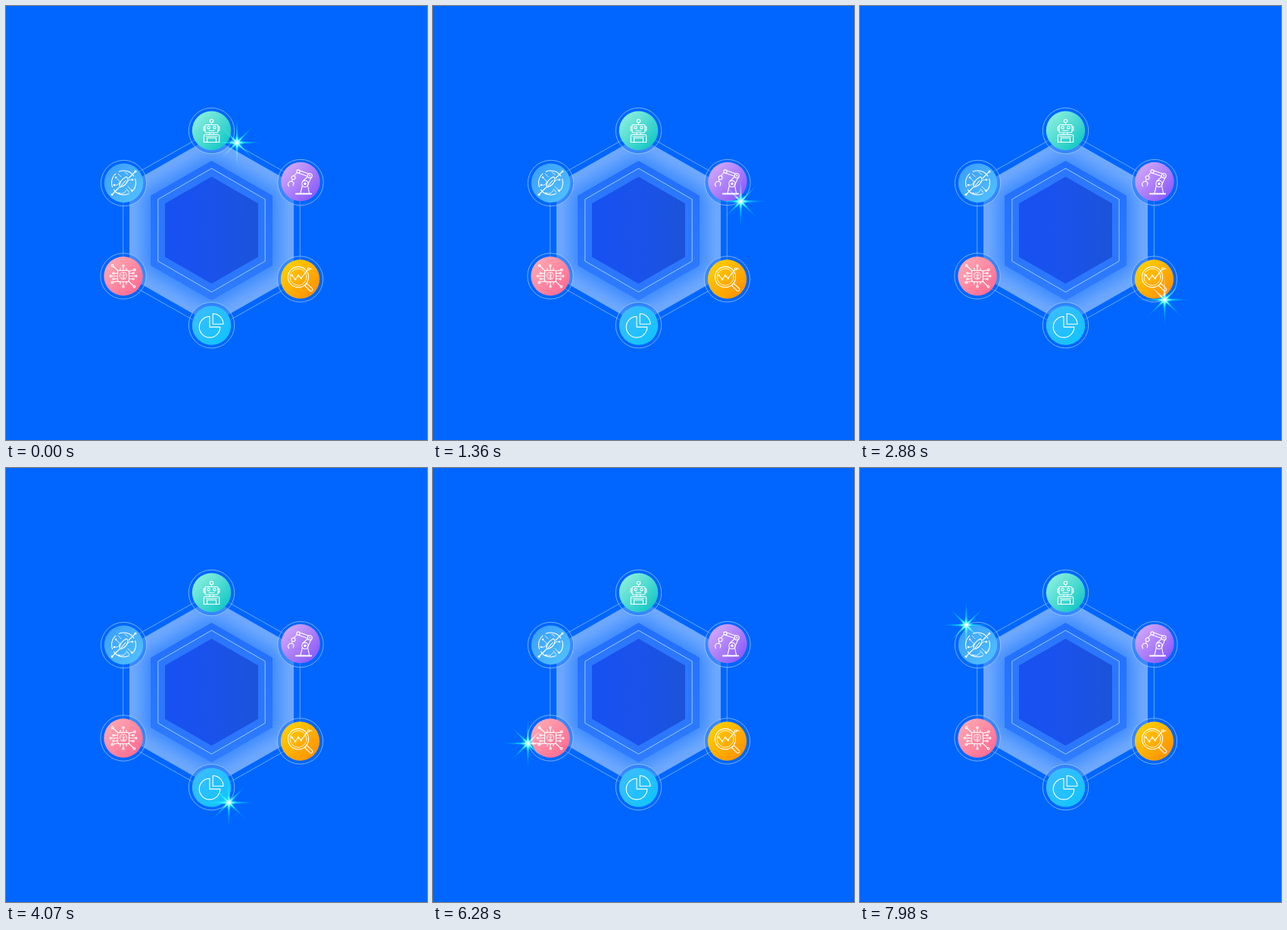
An HTML page that plays this animation: 556x572 px, repeating every 8 s.

```html
<!DOCTYPE html>
<html lang="en">
<head>
<meta charset="utf-8">
<title>Hexagon network</title>
<style>
  html, body { margin: 0; width: 100%; height: 100%; overflow: hidden; background: #06f; }
  svg { display: block; width: 100%; height: 100%; }
  .icon { fill: none; stroke: #fff; stroke-width: 1.1; stroke-linecap: round; stroke-linejoin: round; }
  .solid { fill: #fff; stroke: none; }
  .thin { stroke-width: .8; }
  #star { mix-blend-mode: screen; }
</style>
</head>
<body>
<svg viewBox="0 0 556 572">
  <defs>
    <linearGradient id="core"><stop stop-color="#1751f1"/><stop offset=".5" stop-color="#1a52eb"/><stop offset="1" stop-color="#1c53d9"/></linearGradient>
    <linearGradient id="mid" x1="0" y1="0" x2="0" y2="1"><stop stop-color="#216fff"/><stop offset="1" stop-color="#2f7cff"/></linearGradient>
    <radialGradient id="ray" gradientUnits="userSpaceOnUse" cx="0" cy="0" r="36">
      <stop stop-color="#fff"/><stop offset=".12" stop-color="#6ff"/>
      <stop offset=".3" stop-color="#00d8ff" stop-opacity=".7"/>
      <stop offset=".6" stop-color="#00c0ff" stop-opacity=".35"/>
      <stop offset="1" stop-color="#00b0ff" stop-opacity="0"/>
    </radialGradient>
    <radialGradient id="halo">
      <stop stop-color="#fff"/><stop offset=".22" stop-color="#bff"/>
      <stop offset=".42" stop-color="#00e0ff" stop-opacity=".5"/>
      <stop offset="1" stop-color="#00c0ff" stop-opacity="0"/>
    </radialGradient>
    <filter id="soft" x="-20%" y="-20%" width="140%" height="140%"><feGaussianBlur stdDeviation="11"/></filter>
  </defs>
  <rect width="556" height="572" fill="#06f"/>
  <g id="hexes"></g>
  <g id="discs"></g>

  <g class="icon" id="robot">
    <circle cx="271.5" cy="151.5" r="2.2"/><path d="M271.5 154v2.5"/>
    <rect x="263" y="156.5" width="17" height="10.5" rx="1.5"/>
    <path d="M263 159h-1.8v5h1.8M280 159h1.8v5H280M268 164.3h7M269 167v2.5M274 167v2.5"/>
    <circle cx="267.6" cy="160.2" r="1.7"/><circle cx="275.4" cy="160.2" r="1.7"/>
    <path d="M261.3 179.5v-8q0-2 2-2h16.4q2 0 2 2v8zM265.5 179.5v-5.5h12v5.5M264 172h15"/>
  </g>

  <g class="icon" id="arm">
    <path d="M383 247.5h20" stroke-width="2.2"/>
    <path d="M389 246.5l2.4-10M400.5 246.5l-2-10"/>
    <circle cx="395" cy="234.3" r="4.2"/><circle class="solid" cx="395" cy="234.3" r="1.7"/>
    <path d="M391.8 231l6.6-6M398 237l5-11M400 221.3l-12.5-4.5M398.5 224.5l-12-4.2M384.2 219.5l-4 4.5"/>
    <circle cx="401.3" cy="223.7" r="3"/><circle class="solid" cx="401.3" cy="223.7" r="1.1"/>
    <circle cx="386" cy="218" r="2.1"/><circle cx="379.6" cy="226.2" r="2.5"/>
    <path d="M378.3 228.8l-1.3 2.4M373.5 237.8l-1.2-3.3 2.3-3.2h3.8l1.7 2.6-1 3"/>
  </g>

  <g class="icon" id="lens">
    <circle cx="386" cy="357.2" r="13.6"/><circle class="thin" cx="386" cy="357.2" r="11"/>
    <path d="M394.5 368.5l2.8-2.8 7.2 6.8q1 1.5-.3 2.7-1.4 1.2-2.7.2z"/>
    <path d="M378 355.5l4 4.5 4-4.5 3.8 3.2 8.8-11M401.3 346.3h2.5"/>
    <g class="solid"><circle cx="377.6" cy="355" r="1.3"/><circle cx="382" cy="360.3" r="1.3"/><circle cx="386" cy="355.3" r="1.3"/><circle cx="389.8" cy="359" r="1.3"/></g>
    <circle cx="399.7" cy="346.4" r="1.4"/>
  </g>

  <g class="icon" id="pie" stroke-width="1.4">
    <path d="M269 409.3a13.8 13.8 0 1 0 13.8 13.8H269z"/>
    <path d="M273.2 405.5a13.8 13.8 0 0 1 13.8 13.8h-13.8z"/>
  </g>

  <g class="icon" id="chip">
    <rect x="147.5" y="348.5" width="15" height="15" rx="2"/>
    <path class="thin" d="M155 351.2q-2-1-3 .8-2 .6-1.2 2.7-1.2 2 .6 3.2.4 2.6 3.6 2.3zM155 351.2q2-1 3 .8 2 .6 1.2 2.7 1.2 2-.6 3.2-.4 2.6-3.6 2.3M152.8 354.5l2.2 1.5 2.2-1.5M153 358.5l2-1 2 1"/>
    <g id="pins"></g>
  </g>

  <g class="icon" id="circuit">
    <circle cx="155.5" cy="233" r="16" stroke-dasharray="19 5.2 22 4.1" stroke-dashoffset="6"/>
    <path d="M140 248.5l9-9M162 227l9-9M150 239q-1-9 9-14 2 1 2 4-2 8-11 10zM152 237l6-7"/>
    <path class="thin" d="M145 226l5 5v5M148 221l4 4M161 238l5 5M159 241l4 5M143 236h4l3-3M167 229h-4l-3 3M149 247h6l4-4M157 219l4 3"/>
    <g class="solid"><circle cx="140" cy="248.5" r="1.5"/><circle cx="171" cy="218" r="1.5"/><circle cx="145" cy="226" r="1.3"/><circle cx="166" cy="243" r="1.3"/><circle cx="149" cy="247" r="1.3"/><circle cx="143" cy="236" r="1.3"/><circle cx="167" cy="229" r="1.3"/></g>
  </g>

  <path id="track" fill="none"/>
  <g id="star"></g>
</svg>
<script>
const LOOP = 8000, STEP = 170, TRACK_RADIUS = 30.5;
const byId = id => document.getElementById(id);
const add = (id, markup) => byId(id).insertAdjacentHTML('beforeend', markup);

// Ring centre, disc offset and the two disc colours.
const nodes = [
  { x: 271.5, y: 164.5, dy: -.3, from: '#8cf0de', to: '#10c6c4' },
  { x: 389, y: 232.5, dy: -1, from: '#d2a8fb', to: '#8858fa' },
  { x: 388.5, y: 360, dy: 0, from: '#ffd000', to: '#ff9000' },
  { x: 271.5, y: 420.7, dy: .3, from: '#3cbcff', to: '#10c4ff' },
  { x: 155, y: 356, dy: 0, from: '#ffa8b2', to: '#ff6a92' },
  { x: 155.5, y: 233.5, dy: -.3, from: '#3c9fff', to: '#4fc0ff' }
];

function hexPoints(cy, rx, ry) {
  const cx = 271.5;
  return [[0, -1], [1, -.5], [1, .5], [0, 1], [-1, .5], [-1, -.5]]
    .map(([x, y]) => `${cx + x * rx},${cy + y * ry}`).join(' ');
}

const glow = hexPoints(296, 108.5, 123.5);
add('hexes', `
  <polygon points="${hexPoints(296, 116.8, 131.5)}" fill="none" stroke="#9cc9ff" stroke-width=".8" opacity=".85"/>
  <clipPath id="inside"><polygon points="${glow}"/></clipPath>
  <g clip-path="url(#inside)">
    <polygon points="${glow}" fill="#fff" opacity=".22"/>
    <polygon points="${glow}" fill="none" stroke="#fff" stroke-width="36" opacity=".3" filter="url(#soft)"/>
  </g>
  <polygon points="${hexPoints(296, 80.5, 92)}" fill="url(#mid)"/>
  <polygon points="${hexPoints(295.5, 70.7, 81.5)}" fill="#2b77ff" stroke="#a4d4ff" stroke-width=".9"/>
  <polygon points="${hexPoints(295.5, 61.5, 70.5)}" fill="url(#core)"/>`);

nodes.forEach((n, i) => add('discs', `
  <linearGradient id="disc${i}" x1=".1" y1=".1" x2=".9" y2=".9"><stop stop-color="${n.from}"/><stop offset="1" stop-color="${n.to}"/></linearGradient>
  <circle cx="${n.x}" cy="${n.y}" r="30.2" fill="#06f" fill-opacity=".45" stroke="#b5d8ff" stroke-width=".8" stroke-opacity=".8"/>
  <circle cx="${n.x}" cy="${n.y + n.dy}" r="25.7" fill="url(#disc${i})"/>`));

// The right half of the chip's pins, repeated at a half turn.
for (const turn of [0, 180]) {
  add('pins', `<g transform="translate(155 356) rotate(${turn})">
    <path d="M7.5 -3.8h4.5M7.5 0h8M7.5 3.8h4.5M-4 -7.5v-3M0 -7.5v-5M4 -7.5v-3M7 -6.5l6.5 -1.5M7 7l6.5 6"/>
    <circle cx="13.2" cy="-3.8" r="1.1"/><circle cx="16.8" cy="0" r="1.1"/><circle cx="13.2" cy="3.8" r="1.1"/>
    <circle cx="0" cy="-13.8" r="1.2"/><circle cx="14.8" cy="-8.4" r="1.3"/><circle cx="14.4" cy="13.8" r="1.3"/></g>`);
}

const rayShape = (angle, length, width) =>
  `<path d="M0 ${-width}L${length} 0L0 ${width}L-2 0z" fill="url(#ray)" transform="rotate(${angle})"/>`;
let rays = '';
for (let i = 0; i < 4; i++) {
  rays += rayShape(i * 90, 36, 1.7) + rayShape(i * 90 + 45, 33, 1.4);
}
add('star', `<circle r="9" fill="url(#halo)"/>${rays}<circle r="1.8" fill="#fff"/>`);

// Straight legs between rings, then round the outside of each ring.
function trackPath() {
  const rim = (a, b) => {
    const angle = Math.atan2(b.y - a.y, b.x - a.x);
    return `${a.x + TRACK_RADIUS * Math.cos(angle)} ${a.y + TRACK_RADIUS * Math.sin(angle)}`;
  };
  let d = 'M305 180';
  for (let i = 1; i < 6; i++) {
    const node = nodes[i];
    d += `L${rim(node, nodes[i - 1])}A${TRACK_RADIUS} ${TRACK_RADIUS} 0 1 1 ${rim(node, nodes[(i + 1) % 6])}`;
  }
  return d;
}
const track = byId('track'), star = byId('star');
track.setAttribute('d', trackPath());

// Time in ms and distance along the track.
const travel = [
  [0, 0], [1360, 177.8], [2370, 296.9], [2880, 344.4], [3560, 423], [4070, 499.5],
  [4920, 574.1], [5940, 698.8], [6280, 734.1], [7130, 827.9], [7980, 930.5]
];

function distanceAt(time) {
  const next = Math.max(1, travel.findIndex(([t]) => t >= time));
  const [t0, d0] = travel[next - 1], [t1, d1] = travel[next];
  return d0 + (d1 - d0) * (time - t0) / (t1 - t0);
}

function draw(now) {
  const time = now % LOOP;
  const shift = time > 2000 ? 10 : 0;
  const held = Math.floor((time + shift) / STEP) * STEP - shift;
  const { x, y } = track.getPointAtLength(distanceAt(Math.max(0, held)));
  star.setAttribute('transform', `translate(${x.toFixed(2)} ${y.toFixed(2)})`);
}

let start;
function tick(now) {
  start ??= now;
  draw(now - start);
  requestAnimationFrame(tick);
}
draw(0);
requestAnimationFrame(tick);
</script>
</body>
</html>
```
